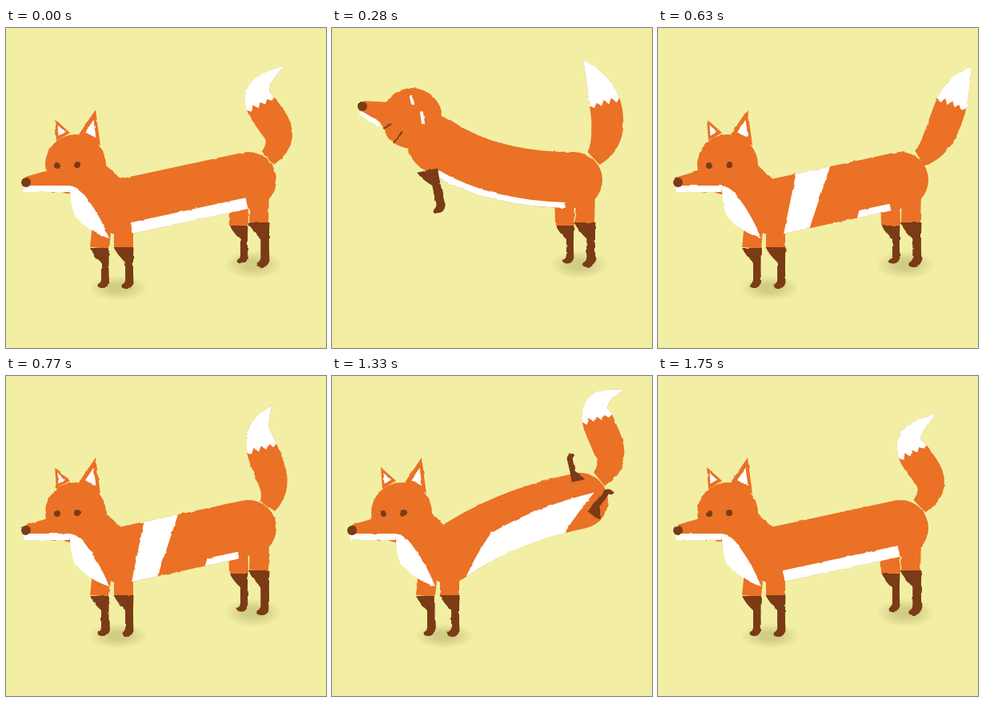
An HTML page that plays this animation: 400x400 px, repeating every 1820 ms.

```html
<!DOCTYPE html>
<html lang="en">
<head>
<meta charset="utf-8">
<title>Rolling fox</title>
<style>
  html, body { margin: 0; width: 100%; height: 100%; overflow: hidden; background: #f2efa5; }
  svg { display: block; width: 100vw; height: 100vh; }
</style>
</head>
<body>
<svg viewBox="0 0 400 400">
  <defs>
    <filter id="rough" filterUnits="userSpaceOnUse" x="0" y="0" width="400" height="400" color-interpolation-filters="sRGB">
      <feTurbulence id="noise" type="fractalNoise" baseFrequency=".12"/>
      <feDisplacementMap in="SourceGraphic" scale="3" xChannelSelector="R" yChannelSelector="G"/>
    </filter>
    <radialGradient id="shade">
      <stop offset=".3" stop-color="#a9a35c" stop-opacity=".45"/>
      <stop offset="1" stop-color="#a9a35c" stop-opacity="0"/>
    </radialGradient>
  </defs>
  <ellipse id="frontShadow" cx="140" cy="325" rx="38" ry="16" fill="url(#shade)"/>
  <ellipse id="rearShadow" cx="309" cy="296" rx="37" ry="18" fill="url(#shade)"/>
  <g id="fox" filter="url(#rough)" fill="none"></g>
</svg>
<script>
const STEP = 70, STEPS = 26;
const ORANGE = '#ea7125', BROWN = '#7a3b16', WHITE = '#fff';
const GIRTH = 35, TIP_START = .6;

// Limbs: x, y, angle, scale. Tail: two controls and the tip.
// White: corners of the belly patch as (along, across) the spine.
const stand = {
  nose: [25, 193], jaw: [60, 191], head: [87, 171],
  shoulder: [145, 224], bend: [224, 207], rump: [303, 190],
  paw: [117, 275, 0, 1], hindL: [291, 247, 0, .95], hindR: [316, 243, 0, 1.12],
  tail: [378, 115, 262, 95, 349, 47],
  white: [.04, .6, .95, .6, .95, 1, .04, 1]
};
const reared = {
  ...stand, nose: [38, 98], jaw: [68, 107], head: [100, 113],
  shoulder: [130, 145], bend: [195, 190],
  paw: [119, 178, -12, 1.1], tail: [357, 135, 345, 80, 314, 40],
  white: [.12, .75, .95, .8, .95, 1, .12, 1]
};
const level = {
  ...stand, nose: [23, 176], jaw: [55, 183], head: [84, 188],
  shoulder: [150, 181], bend: [230, 170],
  paw: [137, 221, -155, 1], tail: [362, 130, 334, 75, 352, 34],
  white: [-.1, -1, .5, -1, .2, 1, -.1, 1]
};
const swung = { ...level, nose: [13, 184], tail: [365, 140, 362, 75, 393, 50] };
const twisted = { ...stand, tail: [355, 120, 288, 85, 333, 37], white: [.22, -1, .49, -1, .235, 1, .03, 1] };
const landed = { ...twisted, tail: swung.tail };
const crouch = {
  ...twisted, nose: [29, 193], head: [89, 171], bend: [220, 208], rump: [303, 208],
  hindL: [285, 253, -14, .85], hindR: [307, 252, -15, .95],
  tail: [380, 140, 270, 105, 366, 71]
};
const kicked = {
  ...stand, bend: [215, 175], rump: [310, 156],
  hindL: [308, 131, -192, .7], hindR: [327, 175, -142, .78],
  tail: [382, 90, 280, 35, 366, 17], white: [.35, .1, 1.1, -.2, .85, 1, .02, 1]
};

const keys = [[0, stand], [2, stand], [4, reared], [7, level], [8, swung], [9, landed], [11, twisted],
  [15, crouch], [16, crouch], [19, kicked], [21, kicked], [23, stand], [STEPS, stand]];

const mix = (a, b, k) => a + (b - a) * k;
const lerp = (a, b, k) => a.map((v, i) => mix(v, b[i], k));
const range = n => Array.from({ length: n + 1 }, (_, i) => i / n);
const shift = ([x, y], dx, dy) => [x + dx, y + dy];

function poseAt(step) {
  const i = keys.findLastIndex(k => k[0] <= step);
  const [[from, a], [to, b]] = [keys[i], keys[i + 1]];
  const k = (step - from) / (to - from);
  return Object.fromEntries(Object.keys(a).map(name => [name, lerp(a[name], b[name], k)]));
}

function bezier(points, t) {
  while (points.length > 1) points = points.slice(1).map((p, i) => lerp(points[i], p, t));
  return points[0];
}

// Point beside a curve, at a distance along its normal.
function beside(curve, t, distance) {
  const [x, y] = bezier(curve, t);
  const [x0, y0] = bezier(curve, t - .01), [x1, y1] = bezier(curve, t + .01);
  const len = Math.hypot(x1 - x0, y1 - y0);
  return [x - (y1 - y0) / len * distance, y + (x1 - x0) / len * distance];
}

const path = (d, fill) => `<path d="${d}" fill="${fill}"/>`;
const shape = (points, fill) => path(`M${points.join('L')}Z`, fill);
const disc = ([x, y], r, fill, rx = r) => `<ellipse cx="${x}" cy="${y}" rx="${rx}" ry="${r}" fill="${fill}"/>`;
const stroke = (d, width, color, cap = 'butt') =>
  `<path d="${d}" stroke="${color}" stroke-width="${width}" stroke-linecap="${cap}"/>`;
const line = (a, b, width, color, cap) => stroke(`M${a}L${b}`, width, color, cap);
const placed = ([x, y, angle = 0, scale = 1], content) =>
  `<g transform="translate(${x} ${y}) rotate(${angle}) scale(${scale})">${content}</g>`;

const ribbon = (curve, half, n = 20) => [
  ...range(n).map(t => beside(curve, t, -half(t))),
  ...range(n).reverse().map(t => beside(curve, t, half(t)))
];

const leg = at => placed(at, path('M-12 0H12Q11 24 12 43Q9 51 2 50Q-4 49-2 45Q3 43 2 36V18Q-7 10-12 0Z', BROWN));

function tail({ rump, tail: [ax, ay, bx, by, x, y] }) {
  const curve = [shift(rump, 24, -27), [ax, ay], [bx, by], [x, y]];
  const half = t => (11 + 9 * Math.sin(Math.min(1, t / .4) * Math.PI / 2)) * (1 - Math.max(0, t * 2 - 1) ** 2);
  const sides = range(12).map(t => mix(TIP_START, 1, t));
  const teeth = range(8).slice(1, -1).map((s, i) =>
    beside(curve, TIP_START + (i % 2 ? .02 : -.03), half(TIP_START) * (1 - 2 * s)));
  return shape(ribbon(curve, half), ORANGE) + shape([
    ...sides.map(t => beside(curve, t, -half(t))),
    ...sides.reverse().map(t => beside(curve, t, half(t))),
    ...teeth
  ], WHITE);
}

function patch(spine, corners) {
  const uv = range(3).map((_, i) => corners.slice(i * 2, i * 2 + 2));
  const edge = uv.flatMap((corner, i) => range(8).map(k => lerp(corner, uv[(i + 1) % 4], k)));
  return shape(edge.map(([u, v]) => beside(spine, u, v * GIRTH)), WHITE);
}

function ear(points) {
  const centre = [0, 1].map(i => points.reduce((sum, p) => sum + p[i], 0) / 3);
  return shape(points, ORANGE) + shape(points.map(p => lerp(centre, p, .5)), WHITE);
}

// Details drawn relative to the centre of the head.
const faces = {
  front: () =>
    ear([[-24, -30], [-26, -57], [-7, -40]]) + ear([[4, -38], [25, -69], [31, -24]]) +
    disc([-23, 1], 4, BROWN) + disc([2, 0], 4, BROWN) +
    path('M-10 26Q4 26 15 43Q32 66 42 92Q14 83-2 62Q-6 50-7 34Z', WHITE),
  side: () =>
    stroke('M-36 13l10-6M-23 31l11-15', 2, BROWN) + stroke('M-1-27l2 9M12-7l2 13', 4, WHITE, 'round'),
  under: () => disc([0, -6], 31, WHITE, 33) + stroke('M-21 25l-2 7M-2 29l-1 10', 2, BROWN)
};

function head(p, view) {
  const { nose, jaw } = p;
  const snout = (tip, base, color) => shape(ribbon([nose, jaw], t => mix(tip, base, t), 1), color);
  const orange = line(p.head, p.shoulder, 50, ORANGE) + disc(p.head, 38, ORANGE) + snout(7, 15, ORANGE);
  const muzzle = {
    front: () => line(shift(nose, -3, 8), shift(p.head, -8, 30), 8, WHITE),
    side: () => line(shift(nose, -3, 8), shift(jaw, -8, 14), 6, WHITE),
    under: () => snout(6, 13, WHITE) + line(p.head, p.shoulder, 40, WHITE)
  };
  return orange + placed(p.head, faces[view]()) + muzzle[view]() + disc(nose, 6, BROWN, view === 'under' ? 3 : 6);
}

function draw(step) {
  const p = poseAt(step);
  const view = step < 3 || step > 8 ? 'front' : step < 6 ? 'side' : 'under';
  const grounded = view === 'front';
  const spine = [p.shoulder, p.bend, p.rump];
  const pawR = shift(p.paw, 30, -1);
  const thigh = (from, to) => line(from, to.slice(0, 2), 24, ORANGE);

  $('fox').innerHTML = [
    tail(p),
    thigh(shift(p.rump, -13, 15), p.hindL), thigh(shift(p.rump, 14, 15), p.hindR),
    stroke(`M${p.shoulder}Q${p.bend} ${p.rump}`, GIRTH * 2, ORANGE, 'round'),
    grounded ? thigh([121, 235], p.paw) + thigh([147, 235], pawR) : '',
    head(p, view),
    patch(spine, p.white),
    step > 5 && step < 18 ? patch(spine, [.64, .75, .88, .75, .88, 1, .61, 1]) : '',
    leg(p.paw), grounded ? leg([...pawR, 0, 1.04]) : '',
    leg(p.hindL), leg(p.hindR)
  ].join('');
  $('noise').setAttribute('seed', step + 1);
  $('frontShadow').setAttribute('opacity', grounded ? 1 : 0);
  $('rearShadow').setAttribute('opacity', step > 16 && step < 23 ? 0 : 1);
}

const $ = id => document.getElementById(id);
const start = performance.now();
let shown = -1;
function tick() {
  const step = Math.floor((performance.now() - start) / STEP) % STEPS;
  if (step !== shown) draw(shown = step);
  requestAnimationFrame(tick);
}
tick();
</script>
</body>
</html>
```
